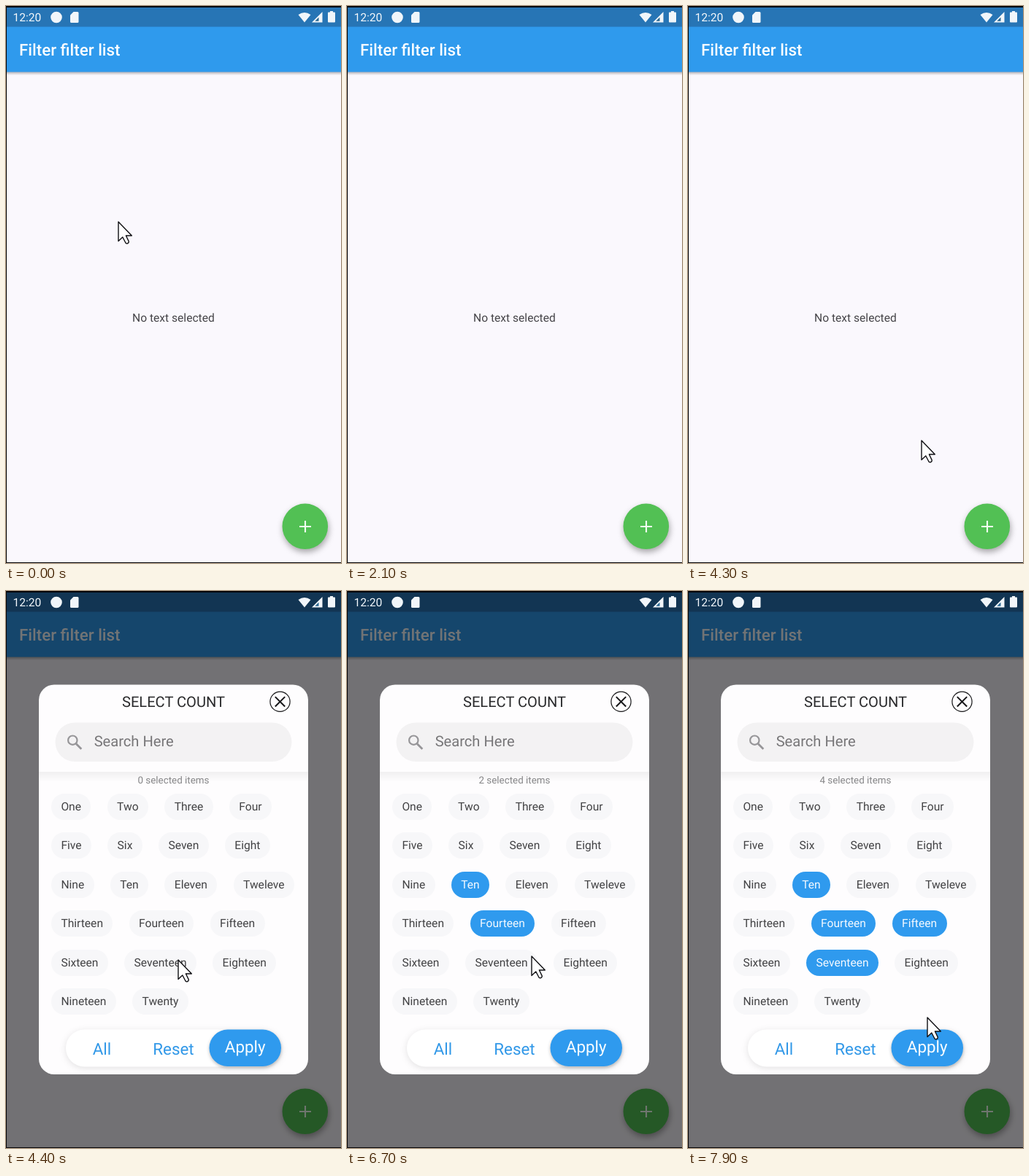
Recreate the animation shown at these times as an HTML page. Size 459x764 px, loop 8000 ms.

```html
<!DOCTYPE html>
<html lang="en">
<head>
<meta charset="utf-8">
<title>Filter filter list</title>
<style>
  html, body { margin: 0; width: 100%; height: 100%; overflow: hidden; background: #faf8fd; }
  #stage { position: relative; width: 459px; height: 764px; overflow: hidden; }
  svg { position: absolute; left: 0; top: 0; }
  svg text, #chips, #count { font-family: Roboto, sans-serif; text-rendering: geometricPrecision; }
  #dialog, #dim { visibility: hidden; }
  .open #dialog, .open #dim { visibility: visible; }
  #chips { position: absolute; left: 62px; top: 278px; }
  .row { display: flex; gap: 22.3px; height: 53.45px; }
  .chip {
    height: 36px; padding: 0 13.4px; border-radius: 18px;
    font-size: 15.6px; line-height: 36px; white-space: nowrap;
    background: #f7f7f9; color: #424244;
  }
  .chip.on { background: #2f9aee; color: #f4f9ff; }
  #count {
    position: absolute; left: 45px; width: 369px; top: 252px;
    font-size: 13.4px; line-height: 18px; text-align: center; color: #858587;
  }
  .soft { filter: drop-shadow(0 2px 5px rgba(0, 0, 0, .11)); }
  .lift { filter: drop-shadow(0 2px 2px rgba(0, 0, 0, .25)); }
  .fab { filter: drop-shadow(1px 4px 4px rgba(0, 0, 0, .34)); }
</style>
</head>
<body>
<div id="stage">
  <svg width="459" height="764">
    <defs>
      <linearGradient id="fade" x2="0" y2="1">
        <stop stop-color="#000" stop-opacity=".3"/>
        <stop offset="1" stop-color="#000" stop-opacity="0"/>
      </linearGradient>
      <linearGradient id="headFade" x2="0" y2="1">
        <stop stop-color="#000" stop-opacity=".055"/>
        <stop offset="1" stop-color="#000" stop-opacity="0"/>
      </linearGradient>
    </defs>
    <rect width="459" height="764" fill="#faf8fd"/>
    <rect y="90" width="459" height="5" fill="url(#fade)"/>
    <rect width="459" height="90.5" fill="#2f9aed"/>
    <rect width="459" height="28.5" fill="#2775b5"/>
    <text x="18" y="68" font-size="22.35" font-weight="500" fill="#fafdff">Filter filter list</text>
    <text x="229.4" y="432.5" font-size="15.6" text-anchor="middle" fill="#454448">No text selected</text>
    <circle class="fab" cx="409.8" cy="713.8" r="31.3" fill="#52c054"/>
    <path d="M402 714h16M410 706v16" stroke="#f2fff2" stroke-width="2.1"/>

    <rect id="dim" width="459" height="764" fill="#000" opacity=".54"/>

    <g fill="#f1f6fa">
      <text x="9.5" y="21" font-size="15.6">12:20</text>
      <circle cx="69" cy="15.5" r="7.8"/>
      <path d="M92.5 8H98q1.5 0 1.5 1.5v12q0 1.5-1.5 1.5h-8.500q-1.500 0-1.500-1.500V12.500z"/>
      <path d="M409 22.500 400.500 12q8.500-6 17 0z"/>
      <path d="M433.500 8v14.500H419z"/>
      <path d="M441 9.500q0-1 1-1h2V7h4v1.500h2q1 0 1 1v12q0 1-1 1h-8q-1 0-1-1z"/>
    </g>
    <path d="M428.500 15.500v5.200h-5.200z" fill="#27658f"/>
    <path d="M0 1H459M.5 0V764M0 763.500H459" stroke="#050508"/>
    <rect width="459" height="2" fill="#050508"/>
  </svg>

  <div id="dialog">
    <svg width="459" height="764">
      <rect x="45" y="128.500" width="369" height="534.500" rx="21" fill="#fefdfe"/>
      <rect x="45" y="248" width="369" height="14" fill="url(#headFade)"/>
      <text x="229.500" y="159" font-size="20.100" text-anchor="middle" fill="#29292b">SELECT COUNT</text>
      <g fill="none" stroke="#161618">
        <circle cx="375.500" cy="151.800" r="13.600" stroke-width="1.200"/>
        <path d="M368.800 145.100l13.400 13.400m0-13.400l-13.400 13.400" stroke-width="2"/>
      </g>
      <rect x="67.500" y="180.500" width="324" height="53.500" rx="26.700" fill="#f3f2f3"/>
      <g fill="none" stroke="#969598" stroke-width="2.200">
        <circle cx="91.300" cy="204.700" r="6.200"/>
        <path d="M96 209.500l7.300 7.200" stroke-width="2.800"/>
      </g>
      <text x="120.700" y="213.300" font-size="20.100" fill="#777678">Search Here</text>
      <rect class="soft" x="82" y="601.500" width="295" height="51" rx="25.500" fill="#fff"/>
      <rect class="lift" x="278.500" y="601.500" width="98.500" height="50.500" rx="25.200" fill="#2f9aee"/>
      <g font-size="22.350" text-anchor="middle" fill="#3198e8">
        <text x="131.500" y="636">All</text>
        <text x="229.500" y="636">Reset</text>
        <text x="327.700" y="633" fill="#fafdff">Apply</text>
      </g>
    </svg>
    <div id="count"></div>
    <div id="chips"></div>
  </div>

  <svg width="459" height="764">
    <path id="cursor" d="M0 0V26.500L5.800 21 10 29q1 1.400 2.800.5t1.400-2.600L10.400 19H18.300Z"
          fill="#fff" stroke="#101014" stroke-width="1.400" stroke-linejoin="round"/>
  </svg>
</div>

<script>
  const LOOP = 8000, TICK = 100, OPEN_AT = 4400;
  const rows = [
    'One Two Three Four', 'Five Six Seven Eight', 'Nine Ten Eleven Tweleve',
    'Thirteen Fourteen Fifteen', 'Sixteen Seventeen Eighteen', 'Nineteen Twenty'
  ];
  const picks = { Ten: 5300, Fourteen: 6200, Seventeen: 7000, Fifteen: 7500 };

  // Pointer stops: time, x, y
  const stops = [
    [0, 154, 296], [600, 330, 372], [700, 330, 372], [1000, 402, 420], [1400, 402, 420],
    [2000, 470, 470], [2200, 470, 540], [3200, 405, 640], [4100, 409, 714], [4200, 409, 714],
    [4300, 320, 596], [4400, 236, 506], [5000, 172, 408], [5400, 172, 407], [5800, 180, 471],
    [6100, 212, 460], [6300, 214, 461], [6700, 253, 501], [6900, 218, 512], [7100, 218, 512],
    [7400, 318, 460], [7600, 319, 461], [7900, 328, 585], [8000, 328, 585]
  ];

  const $ = id => document.getElementById(id);
  const add = (parent, cls, text = '') => {
    const el = document.createElement('div');
    el.className = cls;
    el.textContent = text;
    return parent.appendChild(el);
  };
  const chips = {};
  for (const row of rows) {
    const box = add($('chips'), 'row');
    for (const name of row.split(' ')) chips[name] = add(box, 'chip', name);
  }

  function pointer(t) {
    const i = stops.findIndex(s => s[0] > t);
    const [t0, x0, y0] = stops[i - 1], [t1, x1, y1] = stops[i];
    const k = (t - t0) / (t1 - t0);
    return [x0 + (x1 - x0) * k, y0 + (y1 - y0) * k];
  }

  function draw(now) {
    const t = Math.floor((now % LOOP) / TICK) * TICK;
    $('stage').classList.toggle('open', t >= OPEN_AT);
    let count = 0;
    for (const name in picks) {
      const on = t >= picks[name];
      chips[name].classList.toggle('on', on);
      count += on;
    }
    $('count').textContent = count + ' selected items';
    $('cursor').setAttribute('transform', `translate(${pointer(t)})`);
  }

  const start = performance.now();
  function loop() {
    draw(performance.now() - start);
    requestAnimationFrame(loop);
  }
  loop();
</script>
</body>
</html>
```
